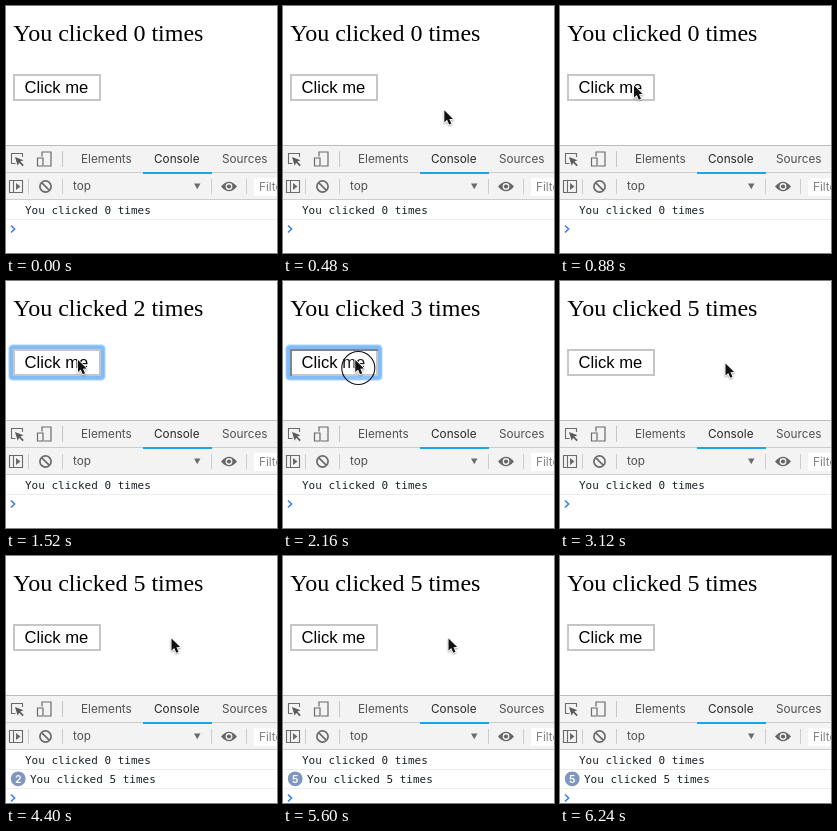
An HTML page with a canvas that plays this animation: 271 px wide and 247 px high, repeating every 7.04 s.

```html
<!DOCTYPE html>
<html lang="en">
<head>
<meta charset="utf-8">
<title>Click counter</title>
<style>
html, body { margin: 0; width: 100%; height: 100%; overflow: hidden; background: #fff; }
canvas { display: block; width: 271px; height: 247px; }
</style>
</head>
<body>
<canvas id="stage"></canvas>
<script>
const W = 271, H = 247, LOOP = 7040, STEP = 80;
const SERIF = '"Liberation Serif", "Times New Roman", serif';
const SANS = '"Liberation Sans", Arial, sans-serif';
const UI = 'Inter, Roboto, sans-serif';
const MONO = '"DejaVu Sans Mono", monospace';

const canvas = document.getElementById('stage');
const ctx = canvas.getContext('2d');
const ratio = window.devicePixelRatio || 1;
canvas.width = Math.round(W * ratio);
canvas.height = Math.round(H * ratio);

const PRESS_TIMES = [960, 1360, 1760, 2160, 2560];
const PRESS_LENGTH = 160;
const BLUR_TIME = 2960;
const LOG_TIME = 4000;
const LOG_GAP = 400;

// Pointer keys: time, x, y
const PATH = [
  [160, 258, 128], [400, 188, 111], [640, 108, 91], [800, 77, 81], [880, 74, 79.5],
  [1120, 72.5, 79], [1520, 72, 79], [2720, 72.5, 79], [2800, 90, 80], [2880, 140, 81],
  [2960, 165.5, 82.5], [6000, 165.5, 82.5], [6080, 188, 80], [6160, 236, 74]
];
const POINTER_END = 6240;

function rect(x, y, w, h, color) {
  ctx.fillStyle = color;
  ctx.fillRect(x, y, w, h);
}

function text(str, x, y, font, color, align = 'left') {
  ctx.font = font;
  ctx.fillStyle = color;
  ctx.textAlign = align;
  ctx.fillText(str, x, y);
}

function poly(points, close = true) {
  ctx.beginPath();
  points.forEach(([x, y]) => ctx.lineTo(x, y));
  if (close) ctx.closePath();
}

function circle(x, y, r) {
  ctx.beginPath();
  ctx.arc(x, y, r, 0, Math.PI * 2);
}

function stroke(color, width) {
  ctx.strokeStyle = color;
  ctx.lineWidth = width;
  ctx.stroke();
}

function fill(color) {
  ctx.fillStyle = color;
  ctx.fill();
}

function pointerAt(t) {
  if (t < PATH[0][0] || t >= POINTER_END) return null;
  const time = Math.floor(t / STEP) * STEP;
  const next = PATH.findIndex(key => key[0] > time);
  if (next < 0) return PATH[PATH.length - 1].slice(1);
  const [t0, x0, y0] = PATH[next - 1];
  const [t1, x1, y1] = PATH[next];
  const k = (time - t0) / (t1 - t0);
  return [x0 + (x1 - x0) * k, y0 + (y1 - y0) * k];
}

function isPressed(t, start) {
  return t >= start && t < start + PRESS_LENGTH;
}

function drawButton(focused, pressed) {
  if (focused) {
    for (const [grow, alpha] of [[5, 0.3], [4, 0.6], [3, 0.5]]) {
      ctx.beginPath();
      ctx.roundRect(7 - grow, 68 - grow, 88 + grow * 2, 27 + grow * 2, grow);
      fill(`rgba(110, 178, 250, ${alpha})`);
    }
  }
  rect(7, 68, 88, 27, pressed ? '#7f8388' : '#c6c6c6');
  rect(9, 70, 84, 23, '#fff');
  if (pressed) {
    rect(9, 93, 86, 2, '#c6c6c6');
    rect(93, 70, 2, 25, '#c6c6c6');
  }
  text('Click me', 18.6, 87, `16.6px ${SANS}`, '#000');
}

function drawPointer([x, y], pressed) {
  if (pressed) {
    circle(x + 3, y + 8, 16.5);
    fill('rgba(255, 255, 255, 0.1)');
    stroke('#111', 1.1);
  }
  ctx.save();
  ctx.translate(x, y);
  ctx.scale(0.92, 0.92);
  poly([[0, 0], [0, 13], [3, 10.3], [5.2, 15.4], [7.6, 14.4], [5.4, 9.5], [9.4, 9.3]]);
  ctx.shadowColor = 'rgba(0, 0, 0, 0.35)';
  ctx.shadowBlur = 2 * ratio;
  ctx.shadowOffsetY = ratio;
  ctx.lineJoin = 'round';
  stroke('#fff', 1.8);
  ctx.shadowColor = 'transparent';
  fill('#111');
  ctx.restore();
}

function drawInspectIcon() {
  const gray = '#6b6b6b';
  poly([[9.5, 157.5], [5.5, 157.5], [5.5, 147.5], [16.5, 147.5], [16.5, 151]], false);
  stroke(gray, 1.1);
  poly([[9, 151], [17.5, 154.3], [14.3, 155.6], [17.8, 159], [16.6, 160.2], [13.1, 156.8], [11.7, 159.8]]);
  fill('#5a5a5a');
}

function drawDeviceIcon() {
  ctx.beginPath();
  ctx.rect(36, 146, 9, 14);
  stroke('#6b6b6b', 1.2);
  rect(30.5, 150.5, 7.5, 11, '#f3f3f3');
  ctx.beginPath();
  ctx.rect(31.5, 152, 5.5, 8);
  stroke('#6b6b6b', 1.2);
}

function drawToolbarIcons() {
  const gray = '#6b6b6b';
  ctx.beginPath();
  ctx.rect(3.5, 174.5, 13, 12);
  ctx.moveTo(7.5, 174.5);
  ctx.lineTo(7.5, 186.5);
  stroke(gray, 1.1);
  poly([[10, 177], [10, 184], [14.5, 180.5]]);
  fill(gray);

  circle(39.5, 180.5, 5.6);
  ctx.moveTo(35.6, 176.6);
  ctx.lineTo(43.4, 184.4);
  stroke(gray, 1.7);

  poly([[188, 177.5], [194.5, 177.5], [191.25, 183.2]]);
  fill(gray);

  ctx.beginPath();
  ctx.moveTo(215, 180.5);
  ctx.quadraticCurveTo(223, 171, 231, 180.5);
  ctx.quadraticCurveTo(223, 190, 215, 180.5);
  fill('#666');
  circle(223, 180.5, 3.4);
  fill('#f3f3f3');
  circle(223, 180.5, 2.1);
  fill('#666');
}

function drawPanel() {
  const font = `11.75px ${UI}`;
  rect(0, 139, W, 55, '#f3f3f3');
  for (const [y, color] of [[139, '#bcbcbc'], [166, '#cccccc'], [193, '#cdcdcd']]) {
    rect(0, y, W, 1, color);
  }
  drawInspectIcon();
  drawDeviceIcon();
  rect(56, 145, 1, 16, '#c6c6c6');
  text('Elements', 75, 157, font, '#505050');
  text('Console', 148, 157, font, '#282828');
  text('Sources', 216, 157, font, '#505050');
  rect(137, 166, 69, 2, '#1aa5e8');

  for (const x of [22, 56, 205, 240]) rect(x, 173, 1, 15, '#ccc');
  drawToolbarIcons();
  text('top', 67, 184, font, '#505050');
  rect(248, 172, 23, 18, '#fff');
  text('Filter', 253, 184.5, font, '#808080');
}

function drawLogLine(count, x, y) {
  text(`You clicked ${count} times`, x, y, `11px ${MONO}`, '#182027');
}

function drawConsole(t) {
  const logged = t >= LOG_TIME;
  const repeats = logged ? Math.min(5, 1 + Math.floor((t - LOG_TIME) / LOG_GAP)) : 0;
  drawLogLine(0, 19, 208);
  rect(0, 213, W, 1, '#ededed');
  if (logged) {
    drawLogLine(5, repeats > 1 ? 24 : 19, 227);
    rect(0, 232, W, 1, '#ededed');
  }
  if (repeats > 1) {
    circle(12.2, 222.8, 7.4);
    fill('#8097bd');
    text(repeats, 12.2, 226.6, `600 10.5px ${UI}`, '#fff', 'center');
  }
  const y = logged ? 242 : 223;
  poly([[5, y - 3.5], [8.6, y], [5, y + 3.5]], false);
  stroke('#3b80ee', 1.6);
}

function draw(t) {
  const clicks = PRESS_TIMES.filter(start => t >= start + PRESS_LENGTH).length;
  const pressed = PRESS_TIMES.some(start => isPressed(t, start));
  const focused = t >= PRESS_TIMES[0] && t < BLUR_TIME;
  const pointer = pointerAt(t);

  ctx.setTransform(ratio, 0, 0, ratio, 0, 0);
  rect(0, 0, W, H, '#fff');
  text(`You clicked ${clicks} times`, 7.2, 35, `24px ${SERIF}`, '#000');
  drawButton(focused, pressed);
  drawPanel();
  drawConsole(t);
  if (pointer) drawPointer(pointer, pressed || isPressed(t, BLUR_TIME));
}

const begin = performance.now();
function tick() {
  draw((performance.now() - begin) % LOOP);
  requestAnimationFrame(tick);
}
tick();
</script>
</body>
</html>
```
